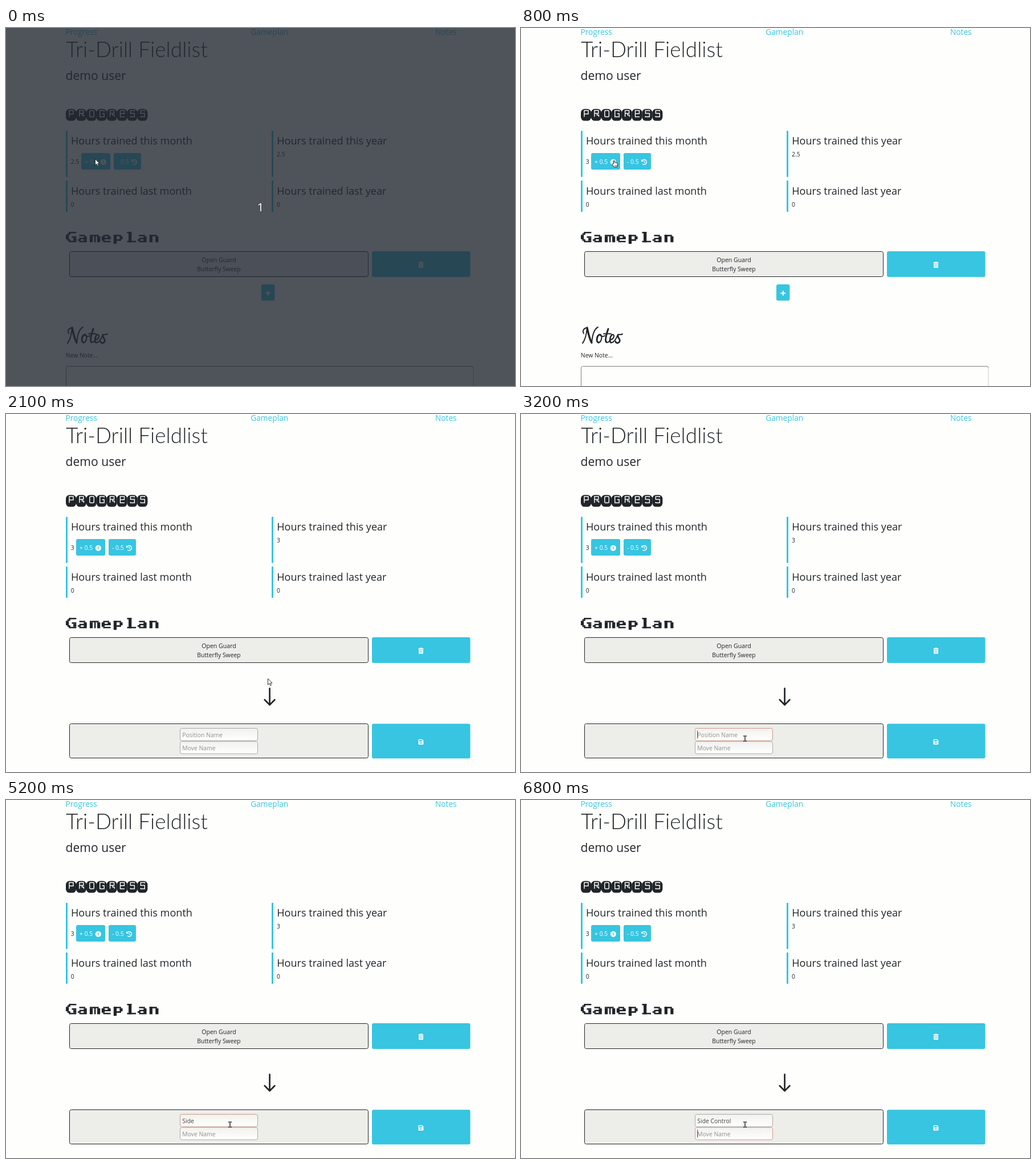
An HTML page for the animation above (8 s loop, 893 by 627 pixels).

```html
<!DOCTYPE html>
<html lang="en">
<head>
<meta charset="utf-8">
<title>Training log</title>
<style>
  html, body { margin: 0; width: 100%; height: 100%; overflow: hidden; background: #fefffc; }
  svg { display: block; }
  text { font: 10.4px "Open Sans", sans-serif; fill: #212529; white-space: pre; }
  .nav text { font-size: 13.7px; font-weight: 500; fill: #37c5e1; }
  .brand { font: 300 37px Lato, sans-serif; }
  .user { font-size: 21.1px; font-weight: 500; }
  .head text { font-size: 18.1px; }
  .strong { font-size: 10.6px; font-weight: 500; }
  .mid { text-anchor: middle; }
  .cyan { fill: #37c5e1; }
  .white, .white text { fill: #fff; }
  .card { fill: #ededea; stroke: #212529; }
  .line { fill: none; stroke: #212529; stroke-linecap: round; stroke-linejoin: round; }
  .field { fill: url(#soft); stroke: #a9aaa7; }
  .field.on { stroke: #d09a86; }
  .hint { fill: #8f908e; }
  .typed { fill: #444; }
  .count { font-size: 20px; fill: #fff; }
</style>
</head>
<body>
<svg width="893" height="627" viewBox="0 0 893 627">
  <defs>
    <linearGradient id="soft" x2="0" y2="1">
      <stop offset="0" stop-color="#f1f1ee"/>
      <stop offset="1" stop-color="#fff"/>
    </linearGradient>
  </defs>

  <g class="nav">
    <text x="104.5" y="12">Progress</text>
    <text x="429.3" y="12">Gameplan</text>
    <text x="753" y="12">Notes</text>
  </g>
  <text class="brand" x="105" y="51">Tri-Drill Fieldlist</text>
  <text class="user" x="104.6" y="91">demo user</text>

  <g id="progress" role="img" aria-label="Progress"></g>

  <g class="cyan">
    <rect x="105" y="180" width="3" height="81" rx="1"/>
    <rect x="466" y="180" width="3" height="81" rx="1"/>
    <rect x="105" y="267" width="3" height="55" rx="1"/>
    <rect x="466" y="267" width="3" height="55" rx="1"/>
  </g>
  <g class="head">
    <text x="114" y="204">Hours trained this month</text>
    <text x="475.2" y="204">Hours trained this year</text>
    <text x="114" y="292">Hours trained last month</text>
    <text x="475.2" y="292">Hours trained last year</text>
  </g>
  <text id="month" x="113.8" y="238">2.5</text>
  <text id="year" x="475" y="225">2.5</text>
  <text x="113.8" y="313">0</text>
  <text x="475" y="313">0</text>

  <g id="buttons">
    <rect class="cyan" x="132" y="219" width="51" height="29" rx="3"/>
    <rect class="cyan" x="189" y="219" width="48" height="29" rx="3"/>
    <g class="white">
      <text x="138" y="238">+ 0.5</text>
      <text x="195" y="238">- 0.5</text>
      <circle cx="170.8" cy="234.8" r="5.1"/>
    </g>
    <path d="M170.6 231.8V235L172.8 236.8" fill="none" stroke="#37c5e1" stroke-width="1.2"/>
    <g fill="none" stroke="#fff" stroke-width="1.4">
      <path d="M221.6 232.2A4.3 4.3 0 1 1 222.2 238"/>
      <path d="M225.2 232.2V235L227 236.4" stroke-width="1.1"/>
    </g>
    <path class="white" d="M220 229.8V234H224.2Z"/>
  </g>

  <g id="gameplan" role="img" aria-label="Gameplan" transform="translate(105 357) scale(2.62)" fill="none" stroke="#212529"></g>

  <rect class="card" x="111.5" y="391.5" width="524" height="44" rx="3"/>
  <text class="strong mid" x="373.5" y="410">Open Guard</text>
  <text class="mid" x="373.5" y="426">Butterfly Sweep</text>
  <rect class="cyan" x="642" y="391" width="172.5" height="45" rx="3"/>
  <path class="white" d="M723.5 410.3H726L726.8 409.3H729.2L730 410.3H732.5V411.7H723.5ZM724.1 412.5H731.9V419Q731.9 420 730.9 420H725.1Q724.1 420 724.1 419Z"/>
  <path d="M726.2 413.7V418.7M728 413.7V418.7M729.8 413.7V418.7" stroke="#37c5e1" stroke-width=".7"/>

  <g id="closed">
    <rect class="cyan" x="448" y="449" width="23.4" height="28.5" rx="3"/>
    <path d="M455.4 464.5H464M459.7 460.2V468.8" stroke="#fff" stroke-width="1.9"/>
    <g class="line" stroke-width="2" role="img" aria-label="Notes">
      <path d="M110 535C107 530 111 525 116 525C115 535 113 546 108 552M124 551C125 541 128 527 135 524"/>
      <path d="M116 525C118 534 120 545 124 551" stroke-width="3.4"/>
      <path d="M139 537C143 538 142 550 136 551M139 537C140 541 144 541 147 539M145 535.5H158"/>
      <path d="M139 537C133 537 131 550 136 551M153 527C150 536 147 547 149.5 550" stroke-width="3"/>
      <path d="M149.5 550C152 552 155 549 157 546C163 545 165 537 161 537M158 551C162 552 167 545 170 537C172 536 174 538 178 536"/>
      <path d="M161 537C157 537 154 549 158 551M170 538C169 543 175 545 173 549C171 553 166 552 166 549" stroke-width="2.7"/>
    </g>
    <text x="104.8" y="577">New Note...</text>
    <path d="M105.5 627V595.5Q105.5 592.5 108.5 592.5H817Q820 592.5 820 595.5" fill="none" stroke="#7c7e80"/>
    <path d="M820 595.5V627" stroke="#c9cac8"/>
  </g>

  <g id="opened">
    <path class="line" d="M462.6 480.5V509M453.8 500.5L462.6 509.5L471.4 500.5" stroke-width="2.7"/>
    <rect class="card" x="111.5" y="542.5" width="524" height="60" rx="3"/>
    <rect class="cyan" x="642" y="542.5" width="172.5" height="60.8" rx="3"/>
    <path class="white" d="M724.5 569.8H730.4L732.4 571.8V578Q732.4 579 731.4 579H724.5Q723.5 579 723.5 578V570.8Q723.5 569.8 724.5 569.8Z"/>
    <path class="cyan" d="M724.9 571.1H729.7V573.5H724.9Z"/>
    <circle class="cyan" cx="728" cy="576.2" r="1.3"/>
    <rect id="field0" class="field" x="305.5" y="550.5" width="136" height="21.5" rx="3"/>
    <rect id="field1" class="field" x="305.5" y="573.5" width="136" height="21.5" rx="3"/>
    <text id="position" x="309.3" y="566"></text>
    <text class="hint" x="309.3" y="589">Move Name</text>
    <rect id="caret" width="1" height="14" fill="#444"/>
  </g>

  <g id="veil">
    <rect width="893" height="627" fill="rgb(36,41,50)" fill-opacity=".8"/>
    <text class="count mid" x="446.5" y="321">1</text>
  </g>

  <g id="arrow">
    <path d="M.5 .5V11.2L3 8.9L4.7 12.7L6.5 11.9L4.8 8.2H8Z" fill="#fff" stroke="#222" stroke-width=".9"/>
  </g>
  <g id="hand">
    <path d="M-1.4 6V.8Q-.4 -.6 .6 .8V3.6L5 4.7Q6 5 5.8 6.5L5 11.4H-.8L-4 7Q-4 5.4 -2.6 5.6Z" fill="#fff" stroke="#222"/>
    <path d="M.8 8V10M2.6 8V10M4.1 8V10" stroke="#222" stroke-width=".7"/>
  </g>
  <g id="beam" fill="none">
    <path d="M-2.8 -4.6H2.8M0 -4.6V4.6M-2.8 4.6H2.8" stroke="#333" stroke-width="2"/>
    <path d="M-2 -4.6H2M0 -4.6V4.6M-2 4.6H2" stroke="#ccc" stroke-width=".6"/>
  </g>
</svg>
<script>
const LOOP = 8000;
const $ = id => document.getElementById(id);
const show = (id, on) => $(id).style.display = on ? '' : 'none';
const put = (id, text) => { if ($(id).textContent !== text) $(id).textContent = text; };
const latest = (list, t) => list.filter(step => step[0] <= t).pop();

// Heading of white letters on rounded tiles
const tiles = {
  P: 'M0 11V0H7V6H0',
  R: 'M0 11V0H7V5H0M4.5 5V8H7.5V11',
  O: 'M1 0H6.5L7.5 1V10L6.5 11H1L0 10V1Z',
  G: 'M7.5 2V0H0V11H7.5V5.5H4',
  E: 'M0 5.5H7V0H0V11H7.5',
  S: 'M7 1.5V0H0V5H7V11H0V9.5'
};
$('progress').innerHTML = [...'PROGRESS'].map((c, i) => {
  const x = 105 + 17.9 * i;
  return `<rect x="${x}" y="141.8" width="18.1" height="20.8" rx="6.5" fill="#212529"/>
    <path transform="translate(${x + 6} 144.5)" d="${tiles[c]}" fill="none" stroke="#fff" stroke-width="1.4"/>`;
}).join('');

// Blocky heading: thin bars, then stems of double width, on an 8-unit pitch
const blocks = {
  G: ['M2 .5H7M1 1.5H3M4 3.5H7M1 5.5H3M2 6.5H7', 'M1 2V5M6 4V6'],
  a: ['M1 2.5H5M1 4.5H6M1 6.5H6', 'M5 3V6.5M1 5V6'],
  m: ['M0 2.5H6M3.5 3V7', 'M1 3V7M6 3V7'],
  e: ['M1 2.5H5M0 4.5H6M1 6.5H6', 'M1 3V6M5 3V5'],
  p: ['M0 2.5H5M0 5.5H5', 'M1 2V8M5 3V5'],
  l: ['M1 .5H4M1 6.5H7', 'M3 0V7'],
  n: ['M0 2.5H5', 'M1 2V7M5 3V7']
};
$('gameplan').innerHTML = [...'Gameplan'].map((c, i) =>
  blocks[c].map((d, k) => `<path transform="translate(${8 * i})" d="${d}" stroke-width="${k + 1}"/>`).join('')
).join('');

// Pointer steps: time, shape, x, y
const moves = [
  [0, 'arrow', 156, 229], [100, 'hand', 157.5, 232],
  [800, 'hand', 164, 232], [900, 'hand', 188, 231], [1000, 'hand', 220, 230],
  [1100, 'arrow', 247, 229], [1200, 'beam', 268, 233.5], [1400, 'beam', 265.5, 233.5],
  [1500, 'arrow', 236, 258], [1600, 'arrow', 264, 322], [1700, 'arrow', 338, 396],
  [1800, 'arrow', 424, 448], [1900, 'hand', 461, 463],
  [2100, 'arrow', 459, 463], [2200, 'arrow', 457, 468], [2300, 'arrow', 447, 488],
  [2400, 'arrow', 430, 516], [2500, 'arrow', 412, 543], [2600, 'beam', 399, 563],
  [2700, 'beam', 393, 568.5]
];

// Time and number of letters typed
const typed = 'Side Control';
const keys = [
  [0, 0], [3900, 1], [4200, 2], [4400, 3], [4500, 4], [4700, 5], [5600, 6],
  [5800, 7], [5900, 8], [6200, 9], [6400, 11], [6600, 12]
];

function draw(t) {
  show('veil', t < 100);
  put('month', t < 600 ? '2.5' : '3');
  put('year', t < 1500 ? '2.5' : '3');
  $('buttons').setAttribute('transform', `translate(${t < 600 ? 0 : -9})`);
  show('closed', t < 2100);
  show('opened', t >= 2100);

  const count = latest(keys, t)[1];
  put('position', count ? typed.slice(0, count) : 'Position Name');
  $('position').setAttribute('class', count ? 'typed' : 'hint');

  const second = t >= 6800;
  $('field0').classList.toggle('on', t >= 2800 && !second);
  $('field1').classList.toggle('on', second);
  show('caret', t >= 2800 && !(t >= 5200 && t < 5600));
  const offset = count && !second ? $('position').getComputedTextLength() : 0;
  $('caret').setAttribute('x', 309.2 + offset);
  $('caret').setAttribute('y', second ? 577.5 : 554.5);

  const [, shape, x, y] = latest(moves, t);
  for (const id of ['arrow', 'hand', 'beam']) show(id, id === shape);
  $(shape).setAttribute('transform', `translate(${x} ${y})`);
}

const start = performance.now();
function tick() {
  draw((performance.now() - start) % LOOP);
  requestAnimationFrame(tick);
}
tick();
</script>
</body>
</html>
```
